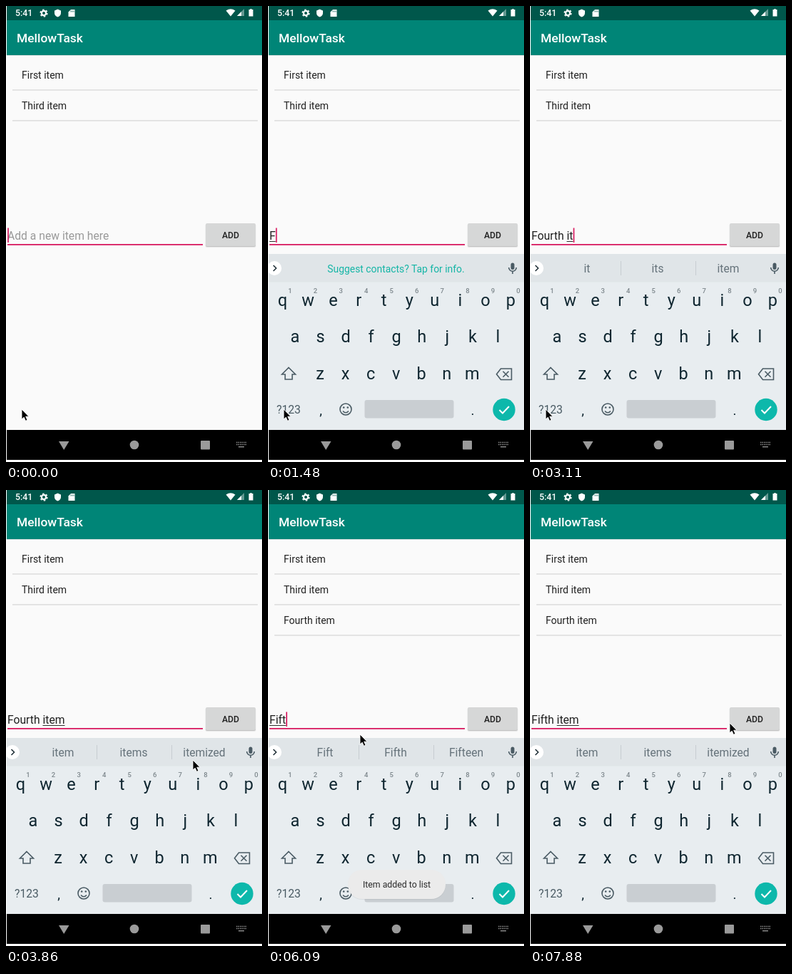
These frames come from a looping animation (359 px wide and 640 px high, 8 s). An HTML page:

```html
<!DOCTYPE html>
<html lang="en">
<head>
<meta charset="utf-8">
<title>Task list</title>
<style>
  html, body { margin: 0; width: 100%; height: 100%; overflow: hidden; background: #fff; }
  svg { display: block; width: 359px; height: 640px; }
  text { font-family: Roboto, sans-serif; white-space: pre; }
  .mid { text-anchor: middle; }
  .medium { font-weight: 500; }
  .item { font-size: 14px; fill: #212121; }
  .field { font-size: 15.7px; fill: #202020; }
  .key { font-size: 23.5px; fill: #0f2630; }
  .digit { font-size: 9.5px; font-weight: 500; fill: #7d878c; }
  .word { font-size: 15.6px; fill: #65727a; }
  .sym { font-size: 15.7px; fill: #4a5b64; }
  .line { fill: none; stroke: #4a5b64; stroke-width: 1.6; }
</style>
</head>
<body>
<svg viewBox="0 0 359 640">
  <rect x="1" width="358" height="637" fill="#fafafa"/>

  <!-- app bar -->
  <rect x="1" y="20" width="358" height="49" fill="#008577"/>
  <rect x="1" y="69" width="358" height="1" fill="#e4e4e4"/>
  <rect x="1" width="358" height="20" fill="#00574b"/>
  <text class="medium" x="15" y="51" font-size="17.4" fill="#fff">MellowTask</text>
  <g fill="#fff">
    <text class="medium" x="13" y="14" font-size="12.3">5:41</text>
    <g fill="none" stroke="#fff">
      <circle cx="53" cy="10" r="3.1" stroke-width="2.2"/>
      <circle cx="53" cy="10" r="4.8" stroke-width="1.6" stroke-dasharray="2.5 2.53"/>
    </g>
    <path d="M72.500 4.500L77 6.500V10Q77 13.500 72.500 15.500Q68 13.500 68 10V6.500Z"/>
    <path d="M91 5H96.500V15H87.500V8.500Z"/>
    <path d="M91 6.500v2M93 6.500v2M95 6.500v2" stroke="#00574b" stroke-width=".8"/>
    <path d="M308.500 6.500Q315 2 321.500 6.500L315 14.500Z"/>
    <path d="M334 4V14H324Z" opacity=".4"/>
    <path d="M330 8V14H324Z"/>
    <path d="M342.500 4h2v1h2v9.500h-6V5h2Z"/>
  </g>

  <!-- list -->
  <g id="list"></g>

  <!-- input row -->
  <rect x="2" y="334" width="274" height="1.800" fill="#d81b60"/>
  <text id="hint" class="field" x="2" y="328" style="fill:#999">Add a new item here</text>
  <text class="field" x="2" y="328"><tspan id="done"></tspan><tspan id="draft"></tspan></text>
  <rect id="under" y="330" height="1" fill="#303030"/>
  <rect id="caret" y="311.500" width="1.700" height="20.500" fill="#d81b60"/>
  <rect x="279.500" y="306" width="71" height="33" rx="2" fill="#000" opacity=".07"/>
  <rect x="280" y="306" width="70" height="32" rx="2" fill="#000" opacity=".16"/>
  <rect x="280" y="305" width="70" height="32" rx="2" fill="#d6d7d7"/>
  <text class="mid medium" x="315" y="325.700" font-size="12.2" fill="#212121">ADD</text>

  <!-- keyboard -->
  <g id="board">
    <rect x="1" y="348" width="358" height="247" fill="#e8edf0"/>
    <rect x="1" y="348" width="358" height="39.500" fill="#e0e5e8"/>
    <circle cx="9" cy="368" r="10" fill="#fff"/>
    <path class="line" d="M7.500 364L11.500 368L7.500 372" style="stroke:#25343b"/>
    <text id="tip" class="mid" x="179.500" y="373.500" font-size="13.9" fill="#14b5a6">Suggest contacts? Tap for info.</text>
    <g id="words">
      <path d="M127.500 358v20M232.500 358v20" stroke="#c7cdd1"/>
    </g>
    <rect x="340.500" y="360.500" width="5" height="9.500" rx="2.500" fill="#4a5b64"/>
    <path class="line" d="M337.700 367a5.300 5.300 0 0 0 10.600 0M343 372.500v3.500" stroke-width="1.400"/>
    <g id="keys"></g>
    <path class="line" d="M29 507.500L38.500 517H34V524H24V517H19.500Z"/>
    <path class="line" d="M326.500 509H341.500V524.500H326.500L320.500 516.800ZM329.500 512.800l8 8m0-8l-8 8"/>
    <text class="sym mid" x="29" y="571.500">?123</text>
    <text class="key mid" x="74" y="573.500" style="font-size:19px">,</text>
    <text class="key mid" x="287" y="573.500" style="font-size:19px">.</text>
    <circle class="line" cx="109" cy="566" r="8"/>
    <path class="line" d="M105 568.500q4 4.500 8 0"/>
    <circle cx="106.200" cy="563.500" r="1.300" fill="#4a5b64"/>
    <circle cx="111.800" cy="563.500" r="1.300" fill="#4a5b64"/>
    <rect x="135.500" y="553" width="125" height="25.500" rx="3" fill="#c9ced2"/>
    <circle cx="331" cy="566.500" r="15.700" fill="#0db8ab"/>
    <path d="M324.500 567l4.500 4.500l9-9.500" fill="none" stroke="#fff" stroke-width="2"/>
  </g>

  <!-- navigation bar -->
  <rect x="1" y="595" width="358" height="42" fill="#000"/>
  <rect y="637" width="359" height="3" fill="#fff"/>
  <g fill="#9a9a9a">
    <path d="M74 611H88.500L81.200 623Z"/>
    <circle cx="180" cy="616" r="6.300"/>
    <rect x="273" y="610" width="13" height="12.500" rx="1"/>
  </g>
  <path d="M323 612.500h14M323 615.500h14" stroke="#8a8a8a" stroke-width="1.500" stroke-dasharray="1.500 1"/>
  <path d="M326 618.700h8" stroke="#8a8a8a" stroke-width="1.500"/>

  <g id="toast">
    <rect x="112" y="534" width="137" height="41" rx="20" fill="#000" opacity=".06"/>
    <rect x="112" y="533" width="137" height="41" rx="20" fill="#ebebeb"/>
    <text class="mid" x="180.500" y="557.500" font-size="12.3" fill="#2b2b2b">Item added to list</text>
  </g>
  <path id="mouse" d="M0 0V14L3.200 11.200L5.500 16.300L8 15.200L5.700 10.200H10Z" fill="#000" stroke="#fff" stroke-width=".9"/>
</svg>

<script>
  const $ = id => document.getElementById(id);
  const LOOP = 8000;

  function add(parent, tag, attrs, text = '') {
    const el = document.createElementNS('http://www.w3.org/2000/svg', tag);
    for (const name in attrs) el.setAttribute(name, attrs[name]);
    el.textContent = text;
    return parent.appendChild(el);
  }

  const rows = ['First item', 'Third item', 'Fourth item'].map((label, i) => {
    const row = add($('list'), 'g', { transform: `translate(0 ${i * 43})` });
    add(row, 'text', { class: 'item', x: 22, y: 102 }, label);
    add(row, 'rect', { x: 9, y: 117, width: 344, height: 1.8, fill: '#e1e1e1' });
    return row;
  });

  [['qwertyuiop', 20.5, 420.5], ['asdfghjkl', 38, 472], ['zxcvbnm', 73, 523.5]].forEach(([letters, x, y], r) => {
    [...letters].forEach((letter, i) => {
      const cx = x + i * 35.55;
      add($('keys'), 'text', { class: 'key mid', x: cx, y }, letter);
      if (r === 0) add($('keys'), 'text', { class: 'digit mid', x: cx + 10.5, y: 403 }, (i + 1) % 10);
    });
  });

  const slots = [80, 179, 278].map(x => add($('words'), 'text', { class: 'word mid', x, y: 374 }));

  const initial = {
    done: '', draft: '', caret: 1, words: '', mouse: [22, 566],
    slide: 247, fade: 0, toast: 0, items: 2
  };

  const type = (done, draft, words) => ({ done, draft, words, caret: 1 });

  // Each step overrides part of the state from its time on.
  const steps = [
    [150, { slide: 150, fade: .5 }],
    [290, { slide: 30, fade: .9 }],
    [440, { slide: 0, fade: 1 }],
    [890, { caret: 0 }],
    [1480, type('', 'F', '')],
    [1780, type('', 'Fo', 'Fo For Found')],
    [1930, type('', 'Fou', 'Fou Four Found')],
    [2080, type('', 'Four', 'Four Fourth Fours')],
    [2220, type('', 'Fourth', 'Fourth Fourths Forth')],
    [2370, type('Fourth ', '', 'Street of I')],
    [2820, type('Fourth ', 'i', 'I in is')],
    [2970, type('Fourth ', 'it', 'it its item')],
    [3120, type('Fourth ', 'ite', 'ite item items')],
    [3260, type('Fourth ', 'item', 'ite item items')],
    [3410, { words: 'item items itemized' }],
    [3710, { caret: 0, mouse: [150, 470] }],
    [3860, { mouse: [262, 379] }],
    [4010, { mouse: [303, 341] }],
    [4150, { mouse: [321, 327] }],
    [4300, { caret: 1 }],
    [4600, { ...type('', '', ''), items: 3, toast: .45 }],
    [4750, { toast: .95, mouse: [217, 336] }],
    [4900, { toast: 1, caret: 0, mouse: [129, 343] }],
    [5490, type('', 'Fi', 'Fi First Fix')],
    [5790, type('', 'Fif', 'Fif Fifth Fifty')],
    [6090, type('', 'Fift', 'Fift Fifth Fifteen')],
    [6240, type('', 'Fifth', 'Fifth Fifths Fifty')],
    [6390, type('Fifth ', '', 'Avenue of grade')],
    [6540, { toast: .7 }],
    [6690, { toast: .25 }],
    [6840, { toast: 0, caret: 0 }],
    [6990, type('Fifth ', 'i', 'I in is')],
    [7140, type('Fifth ', 'it', 'it its item')],
    [7290, type('Fifth ', 'ite', 'ite item items')],
    [7440, type('Fifth ', 'item', 'item items itemized')],
    [7740, { caret: 0, mouse: [205, 335] }],
    [7880, { mouse: [280, 327] }]
  ];

  const show = (el, on) => el.setAttribute('visibility', on ? 'visible' : 'hidden');
  const move = (el, x, y) => el.setAttribute('transform', `translate(${x} ${y})`);
  const width = el => el.textContent ? el.getComputedTextLength() : 0;

  function render(s) {
    $('done').textContent = s.done;
    $('draft').textContent = s.draft;
    const start = 2 + width($('done')), len = width($('draft'));
    $('under').setAttribute('x', start);
    $('under').setAttribute('width', len);
    $('caret').setAttribute('x', start + len + .2);
    show($('caret'), s.caret);
    show($('hint'), !(s.done + s.draft));

    const words = s.words.split(' ');
    slots.forEach((slot, i) => slot.textContent = words[i] || '');
    show($('words'), s.words);
    show($('tip'), !s.words);

    rows.forEach((row, i) => show(row, i < s.items));
    move($('board'), 0, s.slide);
    $('board').setAttribute('opacity', s.fade);
    $('toast').setAttribute('opacity', s.toast);
    move($('mouse'), ...s.mouse);
  }

  const begin = performance.now();
  let last = -1;

  function tick() {
    const t = (performance.now() - begin) % LOOP;
    const past = steps.filter(([at]) => at <= t);
    if (past.length !== last) {
      last = past.length;
      render(Object.assign({}, initial, ...past.map(([, change]) => change)));
    }
    requestAnimationFrame(tick);
  }
  tick();
</script>
</body>
</html>
```
